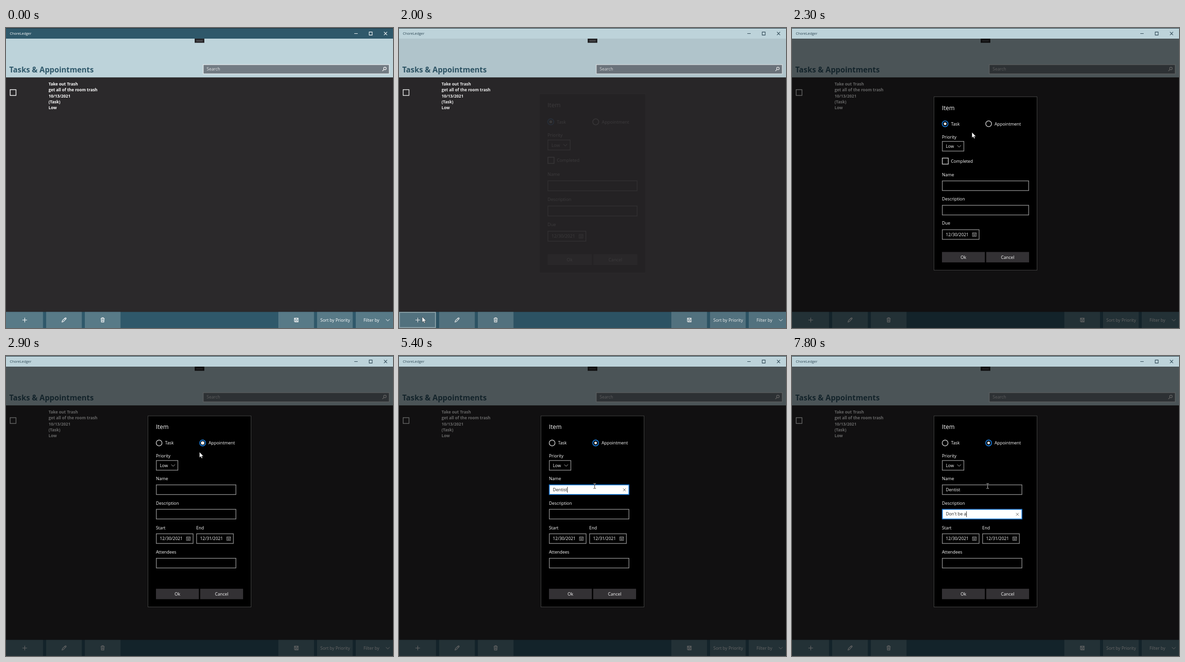
Recreate the animation shown at these times as an HTML page. Size 800 by 621 pixels, loop 8000 ms.

```html
<!DOCTYPE html>
<html lang="en">
<head>
<meta charset="utf-8">
<title>Task list</title>
<style>
html, body { margin: 0; width: 100%; height: 100%; overflow: hidden; background: #2b292b; }
svg { display: block; }
#stage { width: 100vw; height: 100vh; }
text { font: 8.9px "Open Sans", "Noto Sans", sans-serif; fill: #fff; white-space: pre; }
.title { font-size: 7.4px; }
.heading { font-size: 15.7px; font-weight: 700; fill: #2f586a; }
.row { font-size: 8.4px; font-weight: 700; }
.item { font-size: 12.3px; }
.mid { text-anchor: middle; }
.line { fill: none; stroke: #fff; stroke-width: 1.1; }
.box { fill: none; stroke: #8b8b8b; stroke-width: 1.4; }
.field.focus .box { fill: #fff; stroke: #0f73cf; stroke-width: 1.7; }
.field.focus text { fill: #222; }
.clear { fill: none; stroke: #555; stroke-width: .9; }
.caret { fill: #111; }
.ring { fill: none; stroke: #c4c4c4; stroke-width: 1.5; }
.ring.on { stroke: #1877d2; stroke-width: 1.8; }
.calendar { fill: none; stroke: #a0a0a0; stroke-width: .9; }
#ibeam { mix-blend-mode: difference; }
</style>
</head>
<body>
<svg id="stage" viewBox="0 0 800 621" preserveAspectRatio="none"></svg>
<script>
const LOOP = 8000, STEP = 100;

const rect = (x, y, w, h, attrs = '') => `<rect x="${x}" y="${y}" width="${w}" height="${h}" ${attrs}/>`;
const path = (d, attrs = 'class="line"') => `<path d="${d}" ${attrs}/>`;
// y is the middle of the capital letters
const text = (x, y, s, cls = '', lift = 3.2) => `<text x="${x}" y="${y + lift}" class="${cls}">${s}</text>`;
const chevron = (x, y, color = '#fff') =>
  path(`M${x - 3.8} ${y - 1.9}l3.8 3.8l3.8-3.8`, `fill="none" stroke="${color}"`);
const box = (x, y, w, h) => rect(x + .7, y + .7, w - 1.4, h - 1.4, 'class="box"');

const field = (id, y, w) => `<g id="${id}" class="field">${box(310, y, w, 21.4)}
  ${text(318, y + 10.5, '')}${rect(0, y + 4.8, .9, 12, 'class="caret"')}
  ${path(`M463.2 ${y + 8.2}l5.6 5.6m0-5.6l-5.6 5.6`, 'class="clear"')}</g>`;

const dateBox = (x, y, s) => box(x, y, 77.4, 21.4) + text(x + 8, y + 10.8, s) +
  path(`M${x + 63} ${y + 7}h8v7.6h-8zm0 2h8m-6.6 2.1h5.2m-5.2 1.8h5.2`, 'class="calendar"');

const radio = (id, x, y, label, on) => `<circle class="ring ${on ? 'on' : ''}" cx="${x}" cy="${y}" r="6"/>
  ${on ? `<circle id="${id}" cx="${x}" cy="${y}" r="2.8" fill="#ddd"/>` : ''}${text(x + 12.2, y, label)}`;

const dialogButton = (x, y, label) =>
  rect(x, y, 88.7, 21.6, 'fill="#333134"') + text(x + 44.3, y + 10.8, label, 'mid');

// Frame, heading, type choice, priority and buttons are common to both forms
const form = (id, top, height, isTask, body) => `<g id="${id}">
  ${rect(293.5, top, 213, height, 'fill="#000" stroke="#444" stroke-width="1"')}
  ${text(310, top + 22.8, 'Item', 'item', 4.4)}
  ${radio('taskDot', 316.5, top + 56, 'Task', isTask)}
  ${radio('apptDot', 406.5, top + 56, 'Appointment', !isTask)}
  ${text(310, top + 83, 'Priority')}${box(310, top + 91.7, 46, 21.4)}
  ${text(318, top + 102.5, 'Low')}${chevron(345.5, top + 102.5, '#bbb')}
  ${body}
  ${dialogButton(310, top + height - 37.7, 'Ok')}
  ${dialogButton(401.4, top + height - 37.7, 'Cancel')}</g>`;

const taskForm = form('taskForm', 142.3, 359, true,
  rect(310.7, 269.3, 12.4, 12.4, 'class="ring"') + text(328.5, 275.3, 'Completed') +
  text(310, 303.3, 'Name') + box(310, 315.8, 180, 21.4) +
  text(310, 353.7, 'Description') + box(310, 366.3, 180, 21.4) +
  text(310, 404.2, 'Due') + dateBox(310, 416.8, '12/30/2021'));

const appointmentForm = form('apptForm', 124, 395.5, false,
  text(310, 254, 'Name') + field('name', 266, 166) +
  text(310, 304.5, 'Description') + field('description', 316.7, 166) +
  text(310, 355.3, 'Start') + dateBox(310, 367.3, '12/30/2021') +
  text(393.3, 355.3, 'End') + dateBox(393.3, 367.3, '12/31/2021') +
  text(310, 405.8, 'Attendees') + box(310, 418, 166, 21.4));

const listRows = ['Take out Trash', 'get all of the room trash', '10/13/2021', '(Task)', 'Low'];
const barButtons = [[0, 76.5], [83, 73.7], [163, 73.7], [563, 73.7], [643, 73.7], [723, 77]];

const page = `
  ${rect(0, 22, 800, 80.5, 'fill="#bdd3da"')}
  ${rect(390, 22, 20, 8.6, 'fill="#242326"')}
  ${rect(394, 25.2, 12, 2.2, 'fill="#3d3c3f" stroke="#67666a" stroke-width=".6"')}
  ${text(6.8, 86, 'Tasks &amp; Appointments', 'heading', 5.7)}
  ${rect(407.7, 75.8, 384.6, 19.2, 'fill="#727b83" stroke="#e3ebee" stroke-width="1.4"')}
  <g opacity=".8">${text(414.8, 85, 'Search')}</g>
  <circle class="line" cx="783.3" cy="83.8" r="2.7"/>${path('M781.3 85.8l-3.2 3.2')}
  ${rect(0, 102.5, 800, 485.5, 'fill="#2b292b"')}
  ${rect(8.6, 127.6, 12, 12, 'class="line" style="stroke-width:1.4"')}
  ${listRows.map((s, i) => text(88, 116 + i * 12.3, s, 'row', 3)).join('')}
  ${rect(0, 587.7, 800, 33.3, 'fill="#2f586a"')}
  ${barButtons.map(([x, w]) => rect(x, 587.7, w, 33.3, 'fill="#587a87"')).join('')}
  ${rect(1, 588.6, 74.4, 31.4, 'id="hover" fill="none" stroke="#a9bdc4" stroke-width="1.4"')}
  ${path('M34 604.5h9.4m-4.7-4.7v9.4')}
  ${path('M115.8 608.6l.8-3l5.8-5.6q1.2-.5 1.9.3q.6.8 0 1.7l-5.7 5.7zm5.4-7.6l2 2')}
  ${path('M195.8 601.3h8m-5.6 0v-1.5h3.2v1.5m-4.7 0l.5 7.3h5.2l.5-7.3m-4.1 1.7v4m2 -4v4')}
  ${path('M596.2 600.6h7.8v7.8h-6.6l-1.2-1.2zm1.7 0v3h4.4v-3m-3.7 7.6v-2.5h3.2v2.5')}
  <svg x="643" y="587.7" width="67.8" height="33.3">${text(6.8, 17, 'Sort by Priority')}</svg>
  ${text(739, 604.7, 'Filter by')}${chevron(789.2, 604.6)}`;

const titleBar = `${rect(0, 0, 800, 22, 'id="bar"')}${rect(0, 0, 800, 1, 'fill="#20343e"')}
  <g id="barInk">${text(8, 11.5, 'ChoreLedger', 'title', 2.6)}
  ${path('M720 11.5h7M750.8 8.4h6.2v6.2h-6.2zM781.4 8.2l6.4 6.4m0-6.4l-6.4 6.4')}</g>`;

document.getElementById('stage').innerHTML = `${page}
  ${rect(0, 22, 800, 599, 'id="shade" fill="#000"')}${titleBar}
  <g id="dialog">${taskForm}${appointmentForm}</g>
  ${path('M0 0V11.2L2.6 8.8L4.4 12.8L6.2 12L4.4 8.2H8Z', 'id="arrow" fill="#fff" stroke="#222" stroke-width=".5"')}
  ${path('M-2.6-5h2l.6.6l.6-.6h2M0-4.4V4.6M-2.6 5.2h2l.6-.6l.6.6h2', 'id="ibeam" fill="none" stroke="#ccc" stroke-width="1"')}`;

const el = id => document.getElementById(id);
const show = (node, on) => { node.style.display = on ? '' : 'none'; };

// [time, x, y]
const pointer = [
  [1600, 12, 520], [1700, 30, 575], [1800, 44, 596], [1900, 48, 598], [2100, 261, 323],
  [2200, 330, 262], [2300, 372, 216], [2400, 394, 192], [2500, 402, 184], [2600, 403, 182],
  [2900, 400, 199], [3000, 402, 221], [3100, 403, 242], [3200, 404, 258], [3300, 404.5, 269]
];
// [time, shade, dialog opacity, dialog scale]
const opening = [[0, 0, 0, 1], [2000, .07, .09, 1.033], [2100, .37, .87, 1.01], [2200, .6, 1, 1]];
// [time, typed text]
const nameKeys = [[0, ''], [4300, 'D'], [4500, 'De'], [4700, 'Den'], [5000, 'Dent'],
  [5200, 'Denti'], [5300, 'Dentis'], [5400, 'Dentist']];
const descriptionKeys = [[0, ''], ...[1, 2, 3, 4, 5, 6, 7, 9, 10].map((n, i) =>
  [i < 8 ? 6900 + i * STEP : 7800, "Don't be a".slice(0, n)])];

const latest = (table, t) => table.reduce((found, row) => row[0] <= t ? row : found, null);

function drawField(id, value, focused) {
  const group = el(id), label = group.querySelector('text'), caret = group.querySelector('.caret');
  group.classList.toggle('focus', focused);
  label.textContent = value;
  show(caret, focused);
  show(group.querySelector('.clear'), focused && value);
  if (focused) caret.setAttribute('x', 318 + (value ? label.getComputedTextLength() : 0));
}

function draw(t) {
  const active = t >= 1000;
  el('bar').setAttribute('fill', active ? '#bdd3da' : '#2f586a');
  const ink = active ? '#2c4653' : '#fff';
  el('barInk').querySelector('text').style.fill = ink;
  el('barInk').querySelector('path').style.stroke = ink;
  show(el('hover'), t >= 1800 && t < 2100);

  const [, shade, opacity, scale] = latest(opening, t);
  el('shade').setAttribute('opacity', shade);
  el('dialog').setAttribute('opacity', opacity);
  el('dialog').setAttribute('transform', `translate(400 322) scale(${scale}) translate(-400 -322)`);
  show(el('dialog'), opacity > 0);

  const appointment = t >= 2700;
  show(el('taskForm'), !appointment);
  show(el('apptForm'), appointment);
  el('apptDot').setAttribute('r', t < 3000 ? 3.5 : 2.8);
  el('apptDot').setAttribute('fill', t < 3000 ? '#fff' : '#ddd');
  drawField('name', latest(nameKeys, t)[1], t >= 3500 && t < 5800);
  drawField('description', latest(descriptionKeys, t)[1], t >= 5800);

  const spot = latest(pointer, t), editing = t >= 3300;
  show(el('arrow'), spot && !editing);
  show(el('ibeam'), editing);
  if (spot) el(editing ? 'ibeam' : 'arrow').setAttribute('transform', `translate(${spot[1]} ${spot[2]})`);
}

const start = performance.now();
let shown = -1;
function tick() {
  const t = Math.floor((performance.now() - start) % LOOP / STEP) * STEP;
  if (t !== shown) draw(shown = t);
  requestAnimationFrame(tick);
}
tick();
</script>
</body>
</html>
```
